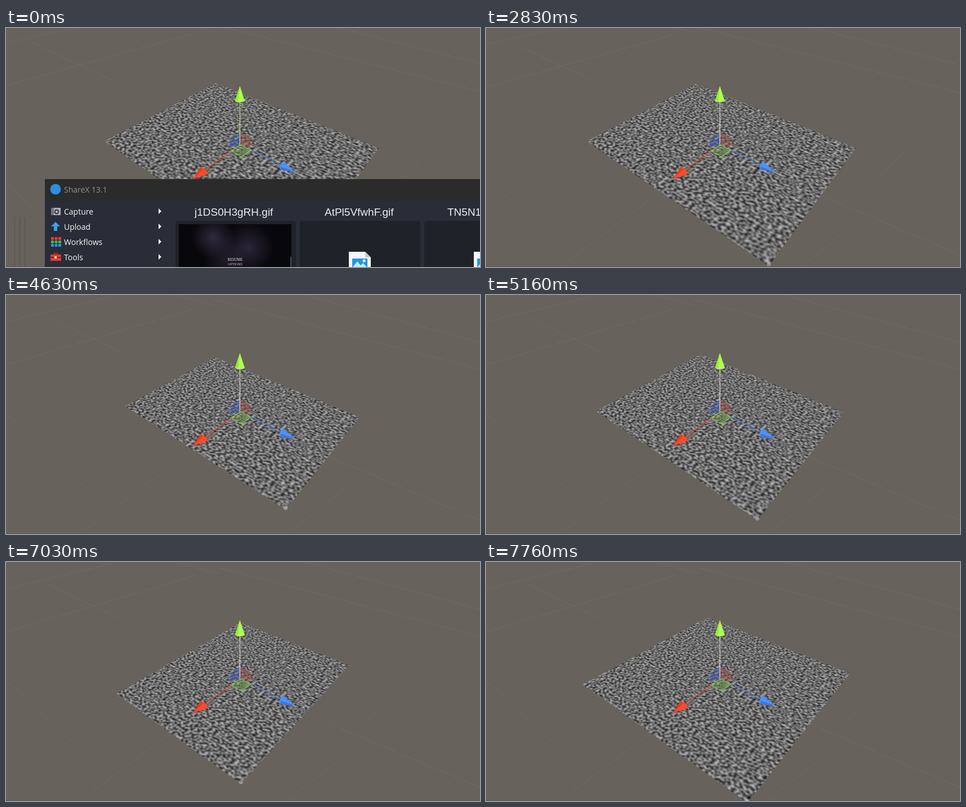
Animation of 842 by 424 pixels, one loop 8000 ms. Source, as an HTML page with a canvas:

```html
<!DOCTYPE html>
<html lang="en">
<head>
<meta charset="utf-8">
<title>Noise plane</title>
<style>
html, body { margin: 0; width: 100%; height: 100%; overflow: hidden; background: #67625b; }
canvas { display: block; }
</style>
</head>
<body>
<canvas id="stage" width="842" height="424"></canvas>
<script>
const W = 842, H = 424, LOOP = 8000, STEP = 200 / 3;
const ctx = document.getElementById('stage').getContext('2d');

// Ground plane in perspective: centre, vanishing points and depth per unit along x and z
const C = [416.5, 207], VX = [974, -214], VZ = [-456, -233];
const GX = -0.1462, GZ = -0.1521;

function toPlane(x, y) {
  const ax = VX[0] - x, ay = VX[1] - y, bx = VZ[0] - x, by = VZ[1] - y;
  const dx = x - C[0], dy = y - C[1], det = ax * by - bx * ay;
  return [(dx * by - bx * dy) / det / GX, (ax * dy - ay * dx) / det / GZ];
}
function toScreen(u, v) {
  const p = u * GX, q = v * GZ, w = 1 + p + q;
  return [0, 1].map(i => (C[i] + p * VX[i] + q * VZ[i]) / w);
}

// Piecewise linear motion through [time, value] pairs
function track(t, keys) {
  let [t0, v0] = keys[0];
  for (const [t1, v1] of keys) {
    if (t < t1) return t1 === t0 || t < t0 ? v0 : v0 + (v1 - v0) * (t - t0) / (t1 - t0);
    t0 = t1; v0 = v1;
  }
  return v0;
}
const ZOOM = [[2693, 1.138], [3560, 1]];
const SIZE_X = [[4093, 1], [4430, .91], [4563, .91], [5160, 1.073], [5500, 1.263]];
const SIZE_Z = [[6563, 1], [6630, .959], [7030, .779], [7160, .76], [7430, .97], [7560, 1.03], [7760, 1.014]];

// Baked gradient noise covering the plane out to EXTENT units from its centre
const LAT = 128, TEX = 768, EXTENT = 1.35, CELLS_PER_UNIT = 33;
let seed = 7;
const rand = () => (seed = (seed * 16807) % 2147483647) / 2147483647;
const angles = Float32Array.from({ length: LAT * LAT }, () => rand() * 2 * Math.PI);
const fade = f => f * f * f * (f * (f * 6 - 15) + 10);
const mix = (a, b, f) => a + (b - a) * f;
function noise(x, y) {
  const i = Math.floor(x), j = Math.floor(y), fx = x - i, fy = y - j;
  const corner = (a, b) => {
    const angle = angles[(j + b) * LAT + i + a];
    return Math.cos(angle) * (fx - a) + Math.sin(angle) * (fy - b);
  };
  const s = fade(fx);
  return mix(mix(corner(0, 0), corner(1, 0), s), mix(corner(0, 1), corner(1, 1), s), fade(fy));
}
const texture = new Uint8ClampedArray(TEX * TEX);
const cellsPerTexel = 2 * EXTENT * CELLS_PER_UNIT / TEX;
for (let y = 0; y < TEX; y++) for (let x = 0; x < TEX; x++) {
  texture[y * TEX + x] = 108 + 135 * noise(x * cellsPerTexel, y * cellsPerTexel);
}
const texel = c => (c / EXTENT + 1) / 2 * TEX | 0;

const layer = document.createElement('canvas');
layer.width = W; layer.height = H;
const layerCtx = layer.getContext('2d');
const image = layerCtx.createImageData(W, H);

function drawPlane(zoom, a, b) {
  const px = new Uint32Array(image.data.buffer);
  px.fill(0);
  for (let y = 80; y < H; y++) for (let x = 150; x < 690; x++) {
    const [pu, pv] = toPlane(x + .5, y + .5);
    const u = pu / zoom, v = pv / zoom;
    if (Math.abs(u) >= a || Math.abs(v) >= b) continue;
    const g = texture[texel(v) * TEX + texel(u)];
    px[y * W + x] = 0xff000000 | g << 16 | g << 8 | g;
  }
  layerCtx.putImageData(image, 0, 0);
  ctx.drawImage(layer, 0, 0);
  const [cx, cy] = toScreen(a * zoom, b * zoom);
  disc(cx, cy - 3, 3.5, 'rgba(215,210,205,.5)');
}

function poly(points, fill, stroke, width = 1) {
  ctx.beginPath();
  points.forEach(p => ctx.lineTo(...p));
  if (fill) { ctx.closePath(); ctx.fillStyle = fill; ctx.fill(); }
  if (stroke) { ctx.strokeStyle = stroke; ctx.lineWidth = width; ctx.stroke(); }
}
function disc(x, y, r, fill) {
  ctx.beginPath(); ctx.arc(x, y, r, 0, 7);
  ctx.fillStyle = fill; ctx.fill();
}
function rect(x, y, w, h, fill, r = 0) {
  ctx.beginPath(); ctx.roundRect(x, y, w, h, r);
  ctx.fillStyle = fill; ctx.fill();
}
function text(s, x, y, font, fill, align = 'left') {
  ctx.font = font; ctx.fillStyle = fill; ctx.textAlign = align;
  ctx.fillText(s, x, y);
}

const GRID = [
  [0, 124, 340, 23], [0, 48, 190, 2], [75, 40, 210, 104], [300, 0, 375, 20],
  [370, 8, 842, 132], [530, 0, 842, 84], [0, 213, 32, 235], [55, 260, 172, 370],
  [138, 419, 310, 290], [575, 287, 842, 400], [640, 285, 712, 214], [500, 423, 600, 345]
];
function drawGround(zoom, early) {
  ctx.fillStyle = '#67625b';
  ctx.fillRect(0, 0, W, H);
  ctx.setLineDash([3, 2]);
  for (const [x0, y0, x1, y1] of GRID) {
    const ends = [[x0, y0], [x1, y1]].map(p => toScreen(...toPlane(...p).map(c => c * zoom)));
    poly(ends, null, 'rgba(200,196,188,.15)');
  }
  ctx.setLineDash([]);
  if (early) for (const x of [15.5, 24.5, 33.5]) poly([[x, 336], [x, H]], null, 'rgba(40,38,34,.25)');
  rect(0, 423, W, 1, '#5b5751');
}

function cone(tip, left, right, light, dark) {
  const mid = [(left[0] * 2 + right[0]) / 3, (left[1] * 2 + right[1]) / 3];
  const cx = (left[0] + right[0]) / 2, cy = (left[1] + right[1]) / 2;
  const dx = right[0] - left[0], dy = right[1] - left[1];
  ctx.beginPath();
  ctx.ellipse(cx, cy, Math.hypot(dx, dy) / 2, 2.5, Math.atan2(dy, dx), 0, 7);
  ctx.fillStyle = light; ctx.fill();
  poly([tip, left, right], light);
  poly([tip, mid, left], dark);
}
function drawGizmo(early) {
  poly([[398, 198], [415, 187], [415, 204], [398, 212]], 'rgba(62,92,190,.4)', 'rgba(70,110,225,.8)');
  poly([[417, 187], [434, 196], [434, 212], [417, 204]], 'rgba(165,75,62,.4)', 'rgba(195,80,65,.65)');
  poly([[400, 218], [417, 207], [435, 217], [418, 229]], 'rgba(105,165,65,.38)');
  poly([[400, 218], [417, 207], [435, 217], [418, 229], [400, 218]], null, '#9cdd62');
  poly([[415.5, 206], [415.5, 130]], null, early ? '#c0e88c' : '#e6e6de');
  poly([[401, 218], [352, 253]], null, '#f0482c', 1.2);
  poly([[435, 216], [490, 244]], null, '#4a86e8', 1.2);
  cone([415.5, 103], [407, 129], [424, 129], '#aeff50', '#92ee30');
  cone([332, 268], [346, 247], [358, 259], '#ff4a28', '#e63c1e');
  cone([513.5, 255], [487, 251], [492, 237], '#4a92ff', '#3478e6');
}

const UI = '14px "Open Sans", sans-serif', FILE = '19px "Liberation Sans", sans-serif';
const ICONS = [
  y => { rect(80, y - 6, 17, 13, '#aeb3b8', 1); rect(80, y - 6, 5, 13, '#70757c', 1); disc(90, y + 1, 4.5, '#41464d'); disc(90, y + 1, 2, '#a7c4dc'); },
  y => poly([[88, y - 8], [96, y], [91, y], [91, y + 8], [85, y + 8], [85, y], [80, y]], '#3aa0f0'),
  y => ['#f03a36', '#39bd4b', '#388df0'].forEach((c, row) => {
    for (let i = 0; i < 3; i++) rect(80 + i * 6.5, y - 8 + row * 6, 5, 5, c, 1);
  }),
  y => { rect(84, y - 7, 9, 5, '#9c2924', 1); rect(79, y - 4, 19, 11, '#de3f35', 1); rect(79, y, 19, 2, '#8e211c'); rect(86, y - 1, 4, 4, '#ddd'); }
];
function page(x) {
  poly([[x, 397], [x + 29, 397], [x + 39, 407], [x + 39, H], [x, H]], '#f3f5f7');
  poly([[x + 29, 397], [x + 39, 407], [x + 29, 407]], '#c3cbd2');
  rect(x + 6, 409, 27, 15, '#2196e3');
  disc(x + 27, 413, 2.5, '#fff');
  poly([[x + 7, H], [x + 15, 414], [x + 21, 421], [x + 25, 417], [x + 32, H]], '#c6e8ff');
}
function smoke(x, y, r, alpha) {
  const g = ctx.createRadialGradient(x, y, 0, x, y, r);
  g.addColorStop(0, `rgba(66,56,84,${alpha})`);
  g.addColorStop(1, 'rgba(66,56,84,0)');
  disc(x, y, r, g);
}
function drawWindow() {
  rect(69, 268, 773, 156, '#2a2d38');
  rect(69, 268, 773, 38, '#2b2b2b');
  disc(88, 286, 9.5, '#2b8fdd');
  text('ShareX 13.1', 103, 292, UI, '#929292');
  ['Capture', 'Upload', 'Workflows', 'Tools'].forEach((label, i) => {
    const y = 325 + i * 27;
    ICONS[i](y);
    text(label, 103, y + 6, UI, '#f4f4f4');
    poly([[271, y - 5], [276, y], [271, y + 5]], '#f4f4f4');
  });
  for (const x of [301, 522, 743]) rect(x, 342, 214, 90, '#1f2229', 5);
  text('j1DS0H3gRH.gif', 335, 333, FILE, '#ececec');
  text('AtPl5VfwhF.gif', 566, 333, FILE, '#ececec');
  text('TN5N1kQ.gif', 784, 333, FILE, '#ececec');
  ctx.save();
  ctx.beginPath(); ctx.rect(307, 348, 200, 76); ctx.clip();
  rect(307, 348, 200, 76, '#08070b');
  smoke(368, 372, 38, .7);
  smoke(430, 390, 46, .6);
  smoke(390, 410, 40, .4);
  text('RESUME', 407, 413, '6.5px "Noto Serif", serif', '#e4e0e8', 'center');
  text('OPTIONS', 407, 421, '6px "Noto Serif", serif', '#c9c5cf', 'center');
  ctx.restore();
  rect(505, 406, 2, 18, '#4a4a50');
  page(609);
  page(831);
}

function draw(t) {
  const zoom = track(t, ZOOM), early = t < 2740;
  drawGround(zoom, early);
  drawPlane(zoom, track(t, SIZE_X), track(t, SIZE_Z));
  drawGizmo(early);
  if (t < 490) drawWindow();
}

const start = performance.now();
let shown = null;
function tick() {
  const t = (performance.now() - start) % LOOP;
  const step = Math.floor((t - 20) / STEP);
  if (step !== shown) {
    shown = step;
    draw(Math.max(0, step * STEP + 27));
  }
  requestAnimationFrame(tick);
}
tick();
</script>
</body>
</html>
```
